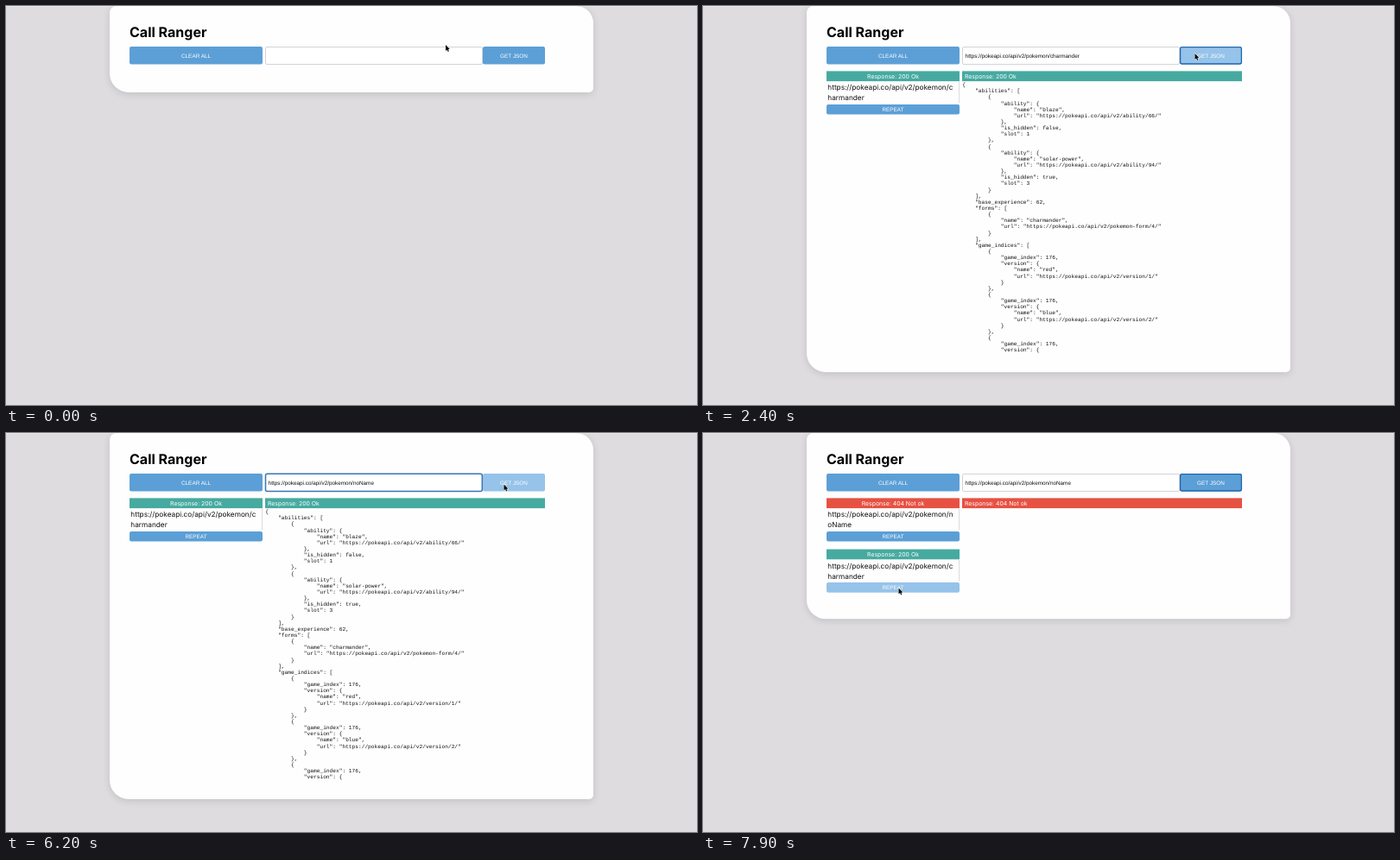
Recreate the animation shown at these times as an HTML page with a canvas. Size 800 by 462 pixels, loop 8 s.

```html
<!DOCTYPE html>
<html lang="en">
<head>
<meta charset="utf-8">
<title>Call Ranger</title>
<style>
  html, body { margin: 0; width: 100%; height: 100%; overflow: hidden; background: #dedcdf; }
  canvas { display: block; width: 800px; height: 462px; }
</style>
</head>
<body>
<canvas id="stage"></canvas>
<script>
const W = 800, H = 462, LOOP = 8000, STEP = 100;
const canvas = document.getElementById('stage');
const dpr = window.devicePixelRatio || 1;
canvas.width = W * dpr;
canvas.height = H * dpr;
const ctx = canvas.getContext('2d');

const SANS = '"Liberation Sans", Arial, sans-serif';
const ROUND = 'Inter, sans-serif';
const MONO = '"Liberation Mono", "Courier New", monospace';
const BLUE = '#5c9fd6', HOVER = '#96c3e9', RING = '#2468b0';
const GREEN = '#46aaa0', RED = '#e75142';

const BASE = 'https://pokeapi.co/api/v2/';
const URL_BASE = BASE + 'pokemon/';
const INPUT_X = 303.6, INPUT_SIZE = 6.37;

const ability = (name, id, hidden, slot) => ({
  ability: { name, url: `${BASE}ability/${id}/` }, is_hidden: hidden, slot
});
const version = (name, id) => ({
  game_index: 176, version: { name, url: `${BASE}version/${id}/` }
});
const jsonLines = JSON.stringify({
  abilities: [ability('blaze', 66, false, 1), ability('solar-power', 94, true, 3)],
  base_experience: 62,
  forms: [{ name: 'charmander', url: BASE + 'pokemon-form/4/' }],
  game_indices: [version('red', 1), version('blue', 2), version('yellow', 3)]
}, null, 4).split('\n').slice(0, 44);

// Pointer keys: time, x, y of the hot spot
const PATH = [
  [0, 509, 45], [300, 453, 61], [1300, 453, 61], [2000, 586, 54],
  [2200, 588.5, 53], [2399, 588.5, 53], [2400, 569.5, 55], [2500, 566, 55],
  [3200, 426, 56], [5500, 426, 56], [6200, 576.5, 59.5],
  [6950, 576.5, 59.5], [7900, 226.5, 179.5], [8000, 226.5, 179.5]
];

// Typed ending of the address: start time, text
const TYPING = [
  [1200, 'charmander'], [4200, ''], [4500, 'n'], [4900, 'noN'],
  [5100, 'noNa'], [5200, 'noNam'], [5400, 'noName']
];

const between = (t, a, b) => t >= a && t < b;
const inside = (p, x, y, w, h) => p.x >= x && p.x <= x + w && p.y >= y && p.y <= y + h;

function pointerAt(t) {
  let i = 0;
  while (i < PATH.length - 2 && t >= PATH[i + 1][0]) i++;
  const [t0, x0, y0] = PATH[i], [t1, x1, y1] = PATH[i + 1];
  const u = Math.min(1, (t - t0) / (t1 - t0));
  const e = u * u * (3 - 2 * u);
  return { x: x0 + (x1 - x0) * e, y: y0 + (y1 - y0) * e };
}

function box(x, y, w, h, r, fill, stroke, line = 1) {
  ctx.beginPath();
  ctx.roundRect(x, y, w, h, r);
  if (fill) { ctx.fillStyle = fill; ctx.fill(); }
  if (stroke) { ctx.strokeStyle = stroke; ctx.lineWidth = line; ctx.stroke(); }
}

function text(s, x, y, size, family, color = '#111', align = 'left', weight = 400) {
  ctx.font = `${weight} ${size}px ${family}`;
  ctx.textAlign = align;
  ctx.fillStyle = color;
  ctx.fillText(s, x, y);
}

function textWidth(s) {
  ctx.font = `400 ${INPUT_SIZE}px ${SANS}`;
  return ctx.measureText(s).width;
}

function button(label, x, y, w, h, pointer, focused) {
  const hot = inside(pointer, x, y, w, h);
  box(x, y, w, h, 2, hot ? HOVER : BLUE);
  if (focused) box(x + 0.6, y + 0.6, w - 1.2, h - 1.2, 2, null, RING, 1.3);
  text(label, x + w / 2, y + h / 2 + 2.3, 6.4, SANS, '#fff', 'center');
}

function panel(h) {
  ctx.save();
  ctx.shadowColor = 'rgba(0,0,0,0.13)';
  ctx.shadowBlur = 9 * dpr;
  ctx.shadowOffsetY = 2 * dpr;
  box(120, 0, 560, h, [8, 20, 5, 22], '#fefefe');
  ctx.restore();
}

function status(ok, x, y, w, centered) {
  ctx.fillStyle = ok ? GREEN : RED;
  ctx.fillRect(x, y, w, 11.7);
  const label = ok ? 'Response: 200 Ok' : 'Response: 404 Not ok';
  text(label, centered ? x + w / 2 : x + 3, y + 8.4, 6.9, ROUND, '#fff', centered ? 'center' : 'left');
}

function historyItem(y, ok, name, pointer) {
  status(ok, 143, y, 154, true);
  ctx.fillStyle = '#dcdade';
  ctx.fillRect(296, y + 12, 1, 25);
  text(URL_BASE + name[0], 144.3, y + 22, 8.25, ROUND);
  text(name.slice(1), 144.3, y + 34, 8.25, ROUND);
  button('REPEAT', 143, y + 38.5, 154, 11.7, pointer);
}

function inputField(t) {
  const focused = between(t, 500, 2000) || between(t, 3400, 6400);
  box(300.5, 47.5, 251, 20, 1.5, '#fff', '#d4d2d6');
  if (focused) box(300.5, 47.3, 250.8, 20.2, 2, null, '#3677b5', 1.5);

  const entry = TYPING.filter(e => t >= e[0]).pop();
  const value = entry ? URL_BASE + entry[1] : '';
  if (between(t, 3400, 4200)) {
    const x = INPUT_X + textWidth(URL_BASE);
    const end = t < 3700 ? 417 : INPUT_X + textWidth(value);
    ctx.fillStyle = '#a9cdf3';
    ctx.fillRect(x, 54, end - x, 7.4);
  }
  text(value, INPUT_X, 59.8, INPUT_SIZE, SANS);

  const caret = between(t, 500, 1000) || between(t, 1200, 1700) || between(t, 4200, 5900);
  if (caret) {
    ctx.fillStyle = '#222';
    ctx.fillRect(INPUT_X + textWidth(value), 54, 0.6, 7.4);
  }
}

function arrow({ x, y }) {
  const pts = [[0, 0], [0, 7], [1.6, 5.6], [2.7, 8], [3.8, 7.5], [2.8, 5.2], [4.8, 5.1]];
  ctx.beginPath();
  pts.forEach(([dx, dy]) => ctx.lineTo(x + dx, y + dy));
  ctx.closePath();
  ctx.lineJoin = 'round';
  ctx.strokeStyle = 'rgba(255,255,255,0.85)';
  ctx.lineWidth = 1.1;
  ctx.stroke();
  ctx.fillStyle = '#000';
  ctx.fill();
}

function beam({ x, y }) {
  ctx.strokeStyle = '#222';
  ctx.lineWidth = 0.8;
  ctx.beginPath();
  ctx.moveTo(x, y - 3.5);
  ctx.lineTo(x, y + 3.5);
  for (const s of [-1, 1]) {
    ctx.moveTo(x - 1.8, y + 4.2 * s);
    ctx.quadraticCurveTo(x, y + 4.2 * s, x, y + 3.2 * s);
    ctx.quadraticCurveTo(x, y + 4.2 * s, x + 1.8, y + 4.2 * s);
  }
  ctx.stroke();
}

function draw(t) {
  const loaded = t >= 2400, failed = t >= 6400;
  const pointer = pointerAt(t);

  ctx.setTransform(dpr, 0, 0, dpr, 0, 0);
  ctx.textRendering = 'geometricPrecision';
  ctx.fillStyle = '#dedcdf';
  ctx.fillRect(0, 0, W, H);
  ctx.fillStyle = '#e9e8ea';
  ctx.fillRect(0, 0, W, 1);

  panel(failed ? 215.3 : loaded ? 424 : 100);
  text('Call Ranger', 143, 35.8, 16, ROUND, '#000', 'left', 700);
  button('CLEAR ALL', 143, 47, 154, 20.6, pointer);
  inputField(t);
  button('GET JSON', 552, 47, 72, 20.6, pointer, between(t, 2400, 3400) || failed);

  if (loaded) {
    status(!failed, 300, 75.4, 324);
    if (failed) {
      historyItem(75.4, false, 'noName', pointer);
      historyItem(134.6, true, 'charmander', pointer);
    } else {
      historyItem(75.4, true, 'charmander', pointer);
      jsonLines.forEach((s, i) => text(s, 300.3, 93.2 + i * 7.14, 6.2, MONO));
    }
  }

  if (between(t, 4200, 5600)) return;
  if (inside(pointer, 300, 47, 251, 21)) beam(pointer);
  else arrow(pointer);
}

function frame(now) {
  draw(Math.floor((now % LOOP) / STEP) * STEP);
  requestAnimationFrame(frame);
}
draw(0);
requestAnimationFrame(frame);
</script>
</body>
</html>
```
